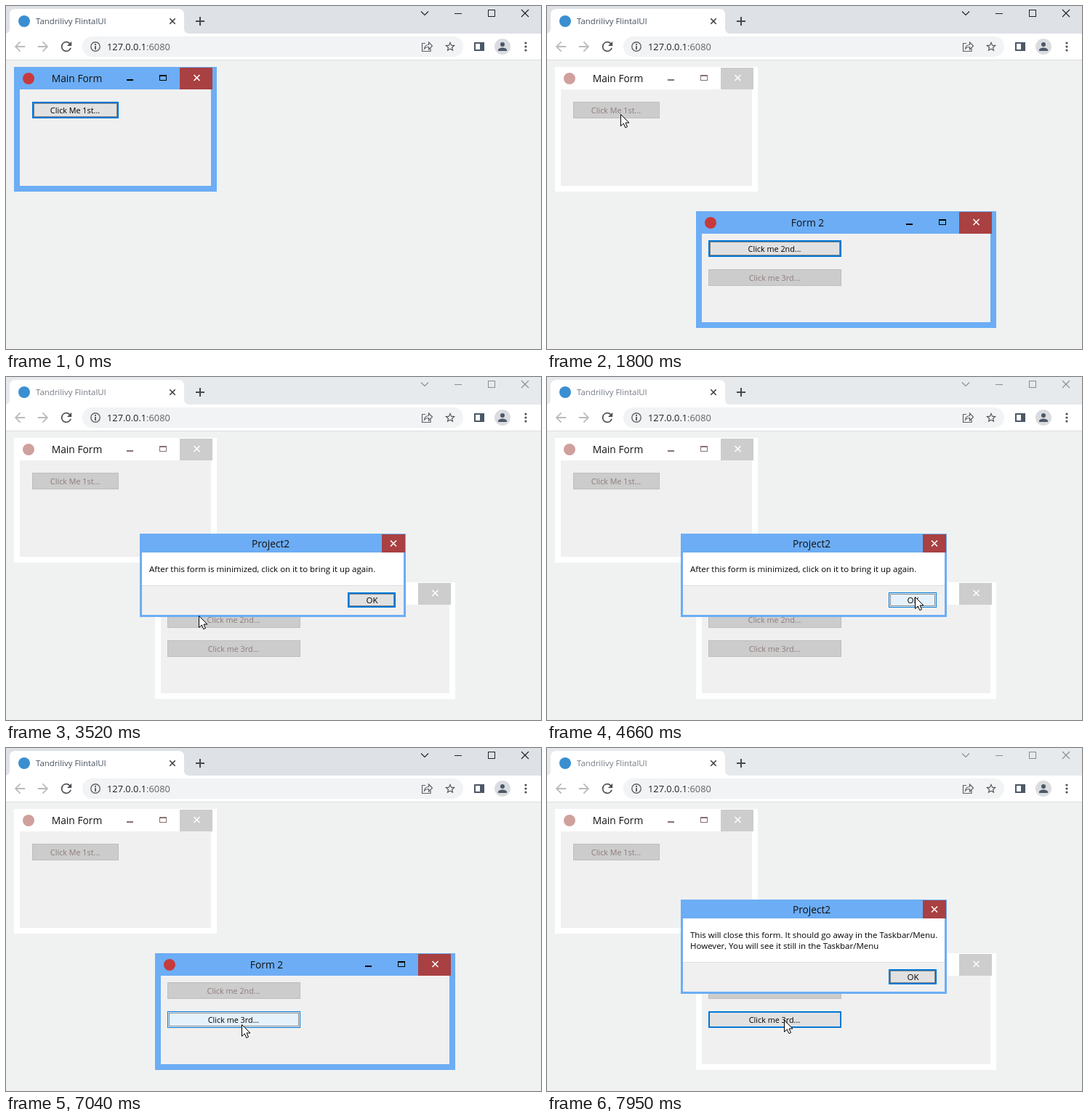
An HTML page with a canvas that plays this animation: 736 by 473 pixels, repeating every 8000 ms.

```html
<!DOCTYPE html>
<html lang="en">
<head>
<meta charset="utf-8">
<title>Two forms</title>
<style>
html, body { margin: 0; width: 100%; height: 100%; overflow: hidden; }
canvas { display: block; }
</style>
</head>
<body>
<canvas id="stage" width="736" height="473"></canvas>
<script>
const c = document.getElementById('stage').getContext('2d');
const LOOP = 8000;
const BLUE = '#6cadf5', FOCUS = '#0078d7', FACE = '#f0f0f0';
const ICONS = {
  back: new Path2D('M20 11H7.83l5.59-5.59L12 4l-8 8 8 8 1.41-1.41L7.83 13H20z'),
  reload: new Path2D('M17.65 6.35A7.96 7.96 0 0 0 12 4a8 8 0 1 0 7.73 10h-2.08A6 6 0 1 1 12 6c1.66 0 3.14.69 4.22 1.78L13 11h7V4z'),
  star: new Path2D('M22 9.24l-7.19-.62L12 2 9.19 8.63 2 9.24l5.46 4.73L5.82 21 12 17.27 18.18 21l-1.63-7.03zM12 15.4l-3.76 2.27 1-4.28-3.32-2.88 4.38-.38L12 6.1l1.71 4.04 4.38.38-3.32 2.88 1 4.28z'),
  share: new Path2D('M577 51.5h-4.5v11h11.5v-4M575.5 59c.5-4 3-5.500 6-5.500v-3.500l5 5-5 5v-3.500c-3 0-4.500.5-6 2.500z'),
  cursor: new Path2D('M.5.5V16.500L4.300 13 6.800 18.700 9.500 17.500 7 12H12z')
};

// Pointer moves: first step, last step, number of steps, end point
const START = [417, 350];
const MOVES = [
  [140, 560, 6, 97, 137],
  [720, 810, 2, 102, 142],
  [970, 1120, 3, 101, 149],
  [2200, 2680, 7, 265, 329],
  [4000, 4660, 9, 506, 303],
  [5490, 5730, 4, 118, 418],
  [5810, 5970, 3, 22, 439],
  [6710, 7040, 5, 324, 381],
  [7110, 7190, 2, 326, 375]
];

function pointer(t) {
  let [x, y] = START;
  for (const [from, to, n, ex, ey] of MOVES) {
    if (t < from) break;
    const k = Math.min(n, 1 + Math.floor((t - from + 6) / (to - from) * (n - 1)));
    const e = (1 - Math.cos(Math.PI * k / n)) / 2;
    x += (ex - x) * e;
    y += (ey - y) * e;
  }
  return [Math.round(x), Math.round(y)];
}

function box(x, y, w, h, color) {
  c.fillStyle = color;
  c.fillRect(x, y, w, h);
}

function frame(x, y, w, h, color, width = 1) {
  c.strokeStyle = color;
  c.lineWidth = width;
  c.strokeRect(x + width / 2, y + width / 2, w - width, h - width);
}

function disc(x, y, r, color) {
  c.fillStyle = color;
  c.beginPath();
  c.arc(x, y, r, 0, 7);
  c.fill();
}

function line(points, color, width) {
  c.strokeStyle = color;
  c.lineWidth = width;
  c.beginPath();
  points.forEach(([x, y], i) => i ? c.lineTo(x, y) : c.moveTo(x, y));
  c.stroke();
}

function cross(x, y, r, color, width) {
  line([[x - r, y - r], [x + r, y + r]], color, width);
  line([[x - r, y + r], [x + r, y - r]], color, width);
}

function text(s, x, y, size, color = '#000', align = 'left') {
  c.font = size + 'px "Open Sans", "Noto Sans", sans-serif';
  c.textAlign = align;
  c.fillStyle = color;
  c.fillText(s, x, y);
}

function icon(name, x, y, scale, color, flip = 1) {
  c.save();
  c.translate(x, y);
  c.scale(scale * flip, scale);
  c.translate(-12, -12);
  c.fillStyle = color;
  c.fill(ICONS[name], 'evenodd');
  c.restore();
}

function browser(active) {
  const ink = active ? '#202124' : '#8a8c90';
  box(0, 0, 736, 473, '#f0f2f1');
  box(0, 0, 736, 38, active ? '#dee1e6' : '#e7eaed');
  box(0, 38, 736, 36, '#fff');
  box(0, 74, 736, 1, '#dcdee0');
  c.fillStyle = '#fff';
  c.fill(new Path2D('M-2 38q7 0 7-7V12q0-8 8-8H237q8 0 8 8V31q0 7 7 7z'));
  disc(25, 21, 8, '#3a8fd0');
  text('Tandrilivy FlintalUI', 41, 25, 11.4, active ? '#45505f' : '#757b84');
  cross(229, 21, 3.7, '#3c4043', 1.6);
  box(261, 20, 12, 2, '#45484d');
  box(266, 15, 2, 12, '#45484d');

  line([[571, 7.5], [576, 12.5], [581, 7.5]], ink, 1.1);
  box(617, 10, 10, 1, ink);
  frame(663, 5, 10, 10, ink);
  cross(714, 10, 5, ink, 1.1);

  icon('back', 19, 56, .9, '#b9bbbe');
  icon('back', 51, 56, .9, '#b9bbbe', -1);
  icon('reload', 83, 56, .9, '#4c5055');
  c.fillStyle = '#f1f3f4';
  c.beginPath();
  c.roundRect(105, 42, 524, 28, 14);
  c.fill();
  c.strokeStyle = '#5f6368';
  c.lineWidth = 1.4;
  c.beginPath();
  c.arc(123, 56, 6.2, 0, 7);
  c.stroke();
  box(122, 52, 2, 2, '#5f6368');
  box(122, 55, 2, 5, '#5f6368');
  text('127.0.0.1', 139, 61, 12.8, '#202124');
  text(':6080', 139 + c.measureText('127.0.0.1').width, 61, 12.8, '#5f6368');
  c.lineWidth = 1.2;
  c.stroke(ICONS.share);
  icon('star', 611, 56, .7, '#4c5055');
  frame(644, 50, 14, 12, '#4c5867', 2);
  box(652, 50, 6, 12, '#4c5867');
  disc(683, 56, 11, '#dadce0');
  disc(683, 53, 3, '#4c5867');
  c.fill(new Path2D('M677 62v-1.500c0-2 4-3 6-3s6 1 6 3v1.500z'));
  for (const y of [51, 56, 61]) disc(715, y, 1.6, '#4c5055');
}

const BUTTON = {
  off: ['#ccc', '#bfbfbf', 1, '#8f7b7b'],
  focus: ['#e1e1e1', FOCUS, 2, '#000', true],
  plain: ['#e1e1e1', FOCUS, 2, '#000'],
  hover: ['#e5f1fb', FOCUS, 1, '#000', true],
  press: ['#cce4f7', '#005499', 1, '#000', true]
};

function button(x, y, w, h, label, state, size = 10.8) {
  const [face, edge, width, ink, dots] = BUTTON[state];
  box(x, y, w, h, face);
  frame(x, y, w, h, edge, width);
  if (dots) {
    c.setLineDash([1, 1]);
    frame(x + 2, y + 2, w - 4, h - 4, '#222');
    c.setLineDash([]);
  }
  text(label, x + w / 2 - (size < 11 ? 1 : 0) + .5, y + h / 2 + 4.5, size, ink, 'center');
}

function form(x, y, w, h, title, active) {
  const r = x + w, ink = active ? '#000' : '#87706f';
  box(x, y, w, h, active ? BLUE : '#fff');
  box(x + 8, y + 31, w - 16, h - 39, FACE);
  disc(x + 20, y + 16, 8, active ? '#c73a3c' : '#d0a09d');
  text(title, (x + 32 + r - 138) / 2, y + 21, 13.8, '#111', 'center');
  box(r - 124, y + 17, 9, 2, ink);
  frame(r - 79, y + 11, 10, 8, ink);
  box(r - 79, y + 11, 10, 2, ink);
  box(r - 51, y + 1, 45, 30, active ? '#a94042' : '#cdcdcd');
  cross(r - 27.500, y + 15, 4, '#fff', 1.6);
}

function dialog(y, lines, state) {
  const x = 184, w = 366, h = 100 + 15 * lines.length;
  box(x, y, w, h, BLUE);
  box(x + 3, y + 26, w - 6, h - 29, FACE);
  box(x + 3, y + 26, w - 6, h - 70, '#fff');
  box(x + 3, y + h - 44, w - 6, 1, '#dfdfdf');
  text('Project2', 364, y + 19, 13.7, '#111', 'center');
  box(517, y + 1, 32, 25, '#a94042');
  cross(533, y + 13.500, 4, '#fff', 1.6);
  lines.forEach((s, i) => text(s, 197, y + 53 + 15 * i, 11.5));
  button(470, y + h - 34, 66, 21, 'OK', state, 11.5);
}

function draw(t) {
  const within = (a, b) => t >= a && t < b;
  const [px, py] = pointer(t);
  const over = (x, y, w, h) => px >= x && px < x + w && py >= y && py < y + h;
  const modal1 = within(3180, 4990), modal2 = t >= 7630;

  browser(!modal1 && !modal2);

  const first = t >= 1370;
  form(11, 84, 279, 172, 'Main Form', !first);
  button(36, 132, 119, 23, 'Click Me 1st...', first ? 'off' : t >= 970 ? 'hover' : 'focus');

  if (within(1800, 4990) || t >= 6220) {
    const second = t < 3180 ? (within(2930, 3020) ? 'press' : over(222, 323, 183, 23) ? 'hover' : 'focus') : 'off';
    const third = t < 6220 ? 'off' : modal2 ? 'plain'
      : within(7380, 7540) ? 'press' : over(222, 363, 183, 23) ? 'hover' : 'focus';
    form(205, 283, 413, 161, 'Form 2', !modal1 && !modal2);
    button(222, 323, 183, 23, 'Click me 2nd...', second);
    button(222, 363, 183, 23, 'Click me 3rd...', third);
  }

  if (within(4990, 6220)) {
    disc(34, 428, 16, '#ed2533');
    box(10, 448, 48, 16, BLUE);
    text('Form 2', 34, 460, 11.5, '#000', 'center');
  }

  if (within(3520, 4990)) {
    dialog(216, ['After this form is minimized, click on it to bring it up again.'],
      t >= 4910 ? 'press' : over(470, 297, 66, 21) ? 'hover' : 'focus');
  }
  if (t >= 7945) {
    dialog(209, ['This will close this form. It should go away in the Taskbar/Menu.',
      'However, You will see it still in the Taskbar/Menu'], 'focus');
  }

  if (t >= 140) {
    c.save();
    c.translate(px, py);
    c.fillStyle = '#fff';
    c.strokeStyle = '#000';
    c.lineWidth = 1;
    c.fill(ICONS.cursor);
    c.stroke(ICONS.cursor);
    c.restore();
  }
}

const begin = performance.now();
function tick() {
  draw((performance.now() - begin) % LOOP);
  requestAnimationFrame(tick);
}
tick();
</script>
</body>
</html>
```
